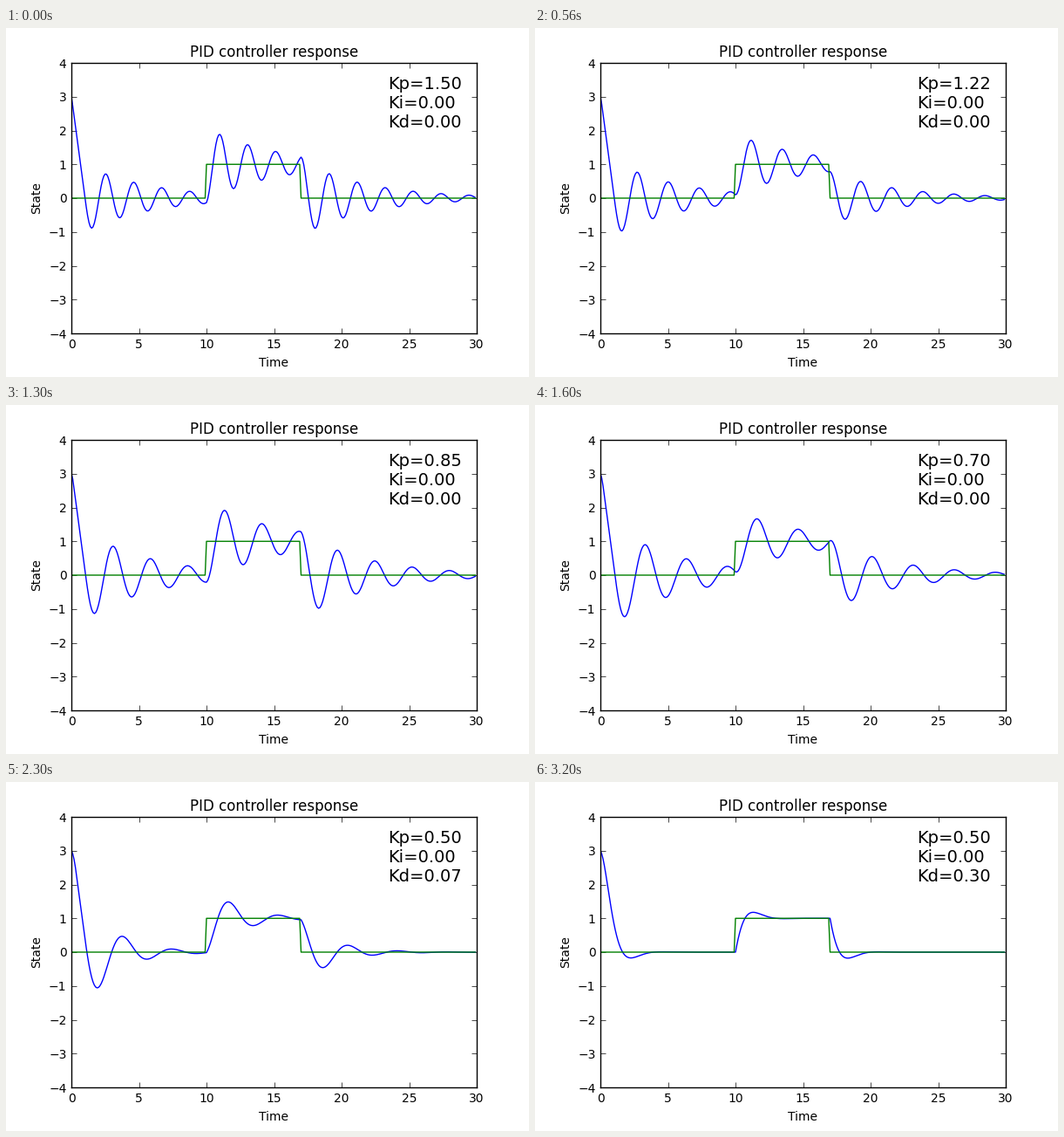
Animation of 600 by 400 pixels, one loop 5000 ms. Source, as a matplotlib script:

```python
import numpy as np
import matplotlib.pyplot as plt
from matplotlib.animation import FuncAnimation

DT = 0.1
GAIN = 6.0        # acceleration per unit of control output
FRICTION = 0.4
MAX_SPEED = 3.0
KP_STEPS, KD_STEPS = 100, 60
FRAMES, INTERVAL = 250, 20

plt.rcParams.update({
    "font.family": "DejaVu Sans",
    "font.size": 10,
    "axes.linewidth": 1.0,
    "axes.titlesize": 12,
    "axes.titlepad": 5,
    "axes.labelpad": 5,
    "lines.linewidth": 1.0,
})

steps = np.arange(300)
times = steps * DT
target = np.where((steps >= 100) & (steps < 170), 1.0, 0.0)


def gains(frame):
    """Kp is lowered first, then Kd is raised, then both rest."""
    kp = 1.5 - 0.01 * min(frame, KP_STEPS)
    kd = 0.005 * min(max(frame - KP_STEPS, 0), KD_STEPS)
    return kp, 0.0, kd


def simulate(kp, ki, kd):
    x, v, total = 3.0, 0.0, 0.0
    last = target[0] - x
    path = []
    for goal in target:
        path.append(x)
        error = goal - x
        total += error * DT
        control = kp * error + ki * total + kd * (error - last) / DT
        last = error
        v += (GAIN * control - FRICTION * v) * DT
        v = min(max(v, -MAX_SPEED), MAX_SPEED)
        x += v * DT
    return path


fig = plt.figure(figsize=(6, 4), dpi=100, facecolor="white")
ax = fig.add_axes([0.125, 0.125, 0.775, 0.775])
ax.set_xlim(0, 30)
ax.set_ylim(-4, 4)
ax.set_xticks(range(0, 31, 5))
ax.set_yticks(range(-4, 5))
ax.tick_params(direction="in", length=4, width=0.5, pad=4, top=True, right=True)
ax.set_title("PID controller response")
ax.set_xlabel("Time")
ax.set_ylabel("State")

state_line, = ax.plot(times, np.zeros_like(times), color="b")
ax.plot(times, target, color="g")
label = ax.text(23.4, 2.1, "", fontsize=14)


def update(frame):
    kp, ki, kd = gains(frame)
    state_line.set_ydata(simulate(kp, ki, kd))
    label.set_text(f"Kp={kp:.2f}\nKi={ki:.2f}\nKd={kd:.2f}")
    return state_line, label


anim = FuncAnimation(fig, update, frames=FRAMES, interval=INTERVAL,
                     init_func=lambda: update(0), repeat=True, repeat_delay=0)
plt.show()
```
